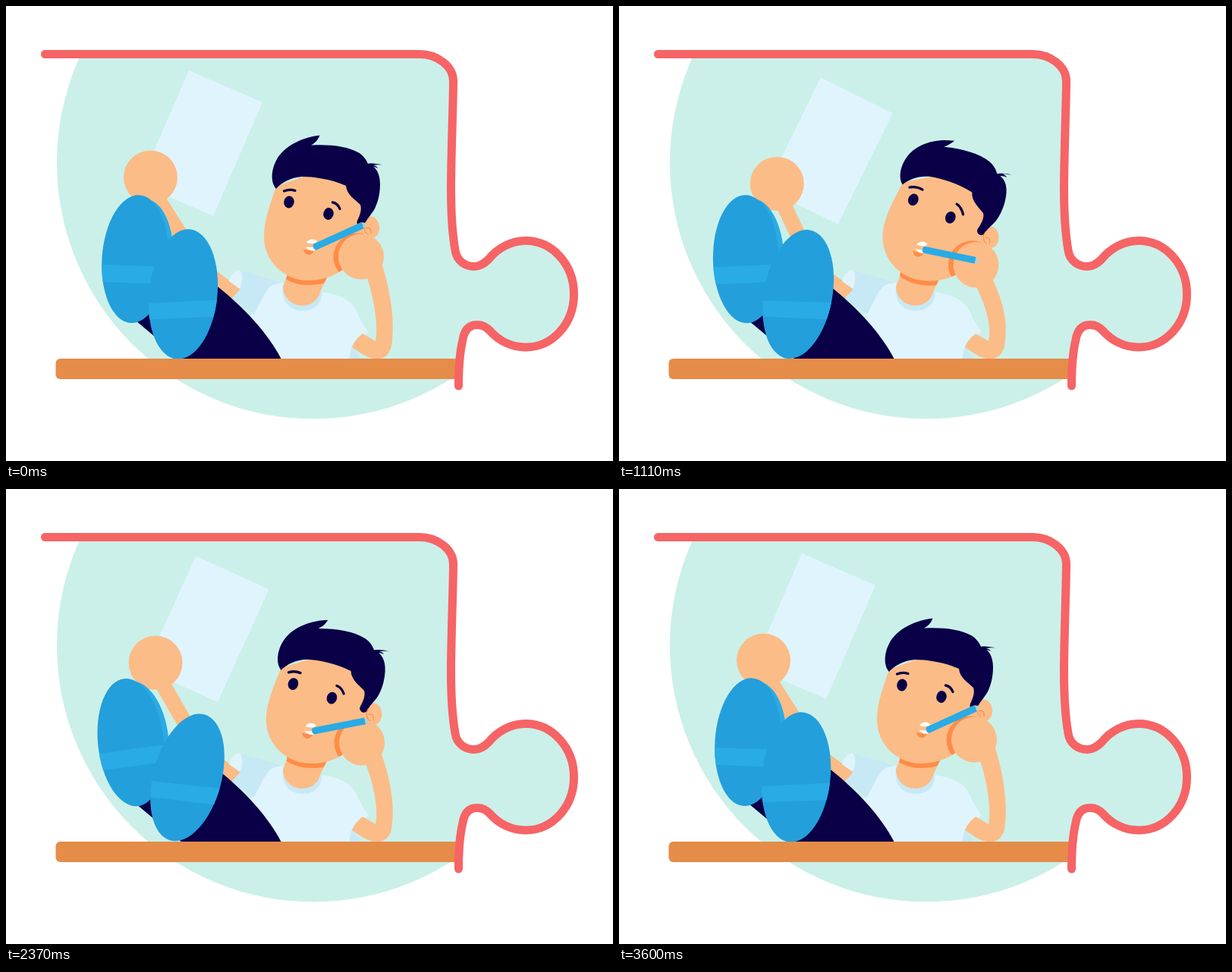
An HTML page with a canvas for the animation above (3.63 s loop, 800 px wide and 600 px high).

```html
<!DOCTYPE html>
<html lang="en">
<head>
<meta charset="utf-8">
<title>Thinking with a pencil</title>
<style>
html, body { margin: 0; width: 100%; height: 100%; overflow: hidden; background: #fff; }
canvas { display: block; }
</style>
</head>
<body>
<canvas id="stage" width="800" height="600"></canvas>
<script>
const ctx = document.getElementById('stage').getContext('2d');
const LOOP = 3630, STEP = 30;
const MINT = '#cbf0e9', PALE = '#e0f4fe', SHADE = '#c7e9f6', SKIN = '#fbbc87', ORANGE = '#ff8c47',
  NAVY = '#090048', BLUE = '#239fdc', SKY = '#29abe5', WOOD = '#e58c49', RED = '#f66466';

const OUTLINE = 'M51.5 63.5H545C568 63.5 589.5 79 589.5 99C589.5 125 586.5 200 586.5 240' +
  'C586.5 275 589 305 592 322C594 336 605 343.5 617 343.5C625 343.5 631 339 636 334' +
  'C648 319 666 309.5 685 309.5C720 309.5 748.5 341 748.5 380C748.5 419 720 450 685 450' +
  'C667 450 650 442 638 428.5C632 422 626 420 620 420.5C610 421 604 428 602 440' +
  'C598 457 596.5 478 596.5 501';
const FACE = 'M356 238C347 265 340 283 340 304C340 338 368 362 398 362' +
  'C422 362 440 353 455 338L475 300L470 255L449 232L400 222Z';
const NECK = 'M372 345L370 357C368 363 365 367 365 372C367 387 378 395 391 395' +
  'C403 395 412 387 414 377L423 358L423 345Z';

const lerp = (a, b, k) => a + (b - a) * k;
const rad = deg => deg * Math.PI / 180;

function fill(color, d) {
  ctx.fillStyle = color;
  ctx.fill(new Path2D(d));
}

function stroke(color, width, d) {
  ctx.strokeStyle = color;
  ctx.lineWidth = width;
  ctx.lineCap = ctx.lineJoin = 'round';
  ctx.stroke(new Path2D(d));
}

function oval(color, x, y, rx, ry = rx, tilt = 0) {
  ctx.fillStyle = color;
  ctx.beginPath();
  ctx.ellipse(x, y, rx, ry, rad(tilt), 0, 2 * Math.PI);
  ctx.fill();
}

function group(draw) {
  ctx.save();
  draw();
  ctx.restore();
}

function spin(x, y, deg) {
  ctx.translate(x, y);
  ctx.rotate(rad(deg));
  ctx.translate(-x, -y);
}

// Cubic Bezier timing (.3, 0, 0, 1)
function glide(x) {
  let lo = 0, hi = 1;
  for (let i = 0; i < 24; i++) {
    const s = (lo + hi) / 2;
    if (0.9 * s * (1 - s) ** 2 + s ** 3 < x) lo = s; else hi = s;
  }
  return lo * lo * (3 - 2 * lo);
}

function leanAt(t) {
  const half = LOOP / 2, e = glide(t % half / half);
  return t < half ? e : 1 - e;
}

function swayAt(t) {
  const period = LOOP / 4, peak = 0.48, p = t % period / period;
  const u = p < peak ? p / peak : (1 - p) / (1 - peak);
  return (u * u * (3 - 2 * u)) ** 1.15;
}

function background() {
  ctx.fillStyle = '#fff';
  ctx.fillRect(0, 0, 800, 600);
  group(() => {
    ctx.clip(new Path2D(OUTLINE + 'V600H0V63.5Z'));
    oval(MINT, 405, 206.5, 338);
    ctx.fillStyle = MINT;
    ctx.fillRect(560, 64, 200, 427);
  });
}

function paperAndArm(k) {
  group(() => {
    ctx.translate(lerp(241, 267.7, k), lerp(85, 95.3, k));
    ctx.rotate(rad(lerp(23.4, 26.4, k)));
    ctx.fillStyle = PALE;
    ctx.fillRect(0, 0, 105.7, 163.3);
  });
  const x = lerp(190.5, 209.6, k), y = lerp(226, 235, k);
  stroke(SKIN, 20.5, `M${lerp(188, 206, k)} 236L${lerp(235, 240, k)} 310L250 335`);
  oval(SKIN, x, y, 35.5);
  fill(SKIN, 'M270 344L309 373L298 388L262 362Z');
}

function body() {
  fill(SHADE, 'M309 349L352 361L364 366C346 373 340 390 330 408L297 386L309 373Z');
  fill(PALE, 'M304 349C298 353 295 358 294 363L308 373C312 365 312 356 309 349C307 348 305 348 304 349Z');
  fill(PALE, 'M363 466L318 408L327 406C336 391 342 373 351 368C356 366 361 366 366 365' +
    'L415 377C442 381 455 388 462 403C467 414 472 422 478 430L456 448L452 466Z');
  fill(SHADE, 'M456 449L452 466H468Z');
  fill(SHADE, 'M365 368C362 390 374 402 391 402C407 402 418 391 416 375L390 370Z');
  fill(NAVY, 'M165 410L232 466H363C346 433 315 398 275 367L225 360Z');
}

function foot(x, y, rx, ry, tilt, stripe, rim) {
  if (rim) oval(SKY, x + 7.5, y - 2, rx - 1, ry - 6.5, tilt);
  oval(BLUE, x, y, rx, ry, tilt);
  ctx.clip();
  fill(SKY, stripe);
}

function feet(k) {
  group(() => {
    spin(170, 364, -12.4 * k);
    foot(170, 333.7, 43.5, 84.5, 4, 'M110 340L220 344.5V367.5L110 363Z', true);
  });
  group(() => {
    spin(234, 415, 11 * k);
    foot(233.5, 380, 45, 86, 6, 'M180 392.3L290 387V409.5L180 413.5Z');
  });
}

function hair(k) {
  fill(NAVY, 'M356 241C348 232 350 215 356 204C364 188 385 174 ' +
    `${413.5 + k} ${170.5 + 3 * k}C411 177 408 180 402 183.5C427 182 450 185 464 193` +
    'C471 197 475 203 477 208C487 211 493 220 493 235C493 250 489 262 485 269' +
    'C480 277 475 281 473 288C471 291 467 292 464 289C462 287 462 284 464 281' +
    'C467 274 469 268 467 262C460 255 449 249 448 237C428 228 405 225 390 225' +
    'C375 226 363 233 356 241Z');
  const y = 208 - 3.5 * k;
  fill(NAVY, `M474 209C480 206 488 ${y} 497 ${y + 1.5}C490 ${y + 1} 487 ${y + 2} 484 ${y + 2}` +
    `C488 ${y + 3} 489 ${y + 4} 490 ${y + 6}C487 ${y + 4} 483 ${y + 4} 478 212Z`);
}

function head(k) {
  const turn = 9.6 * k;
  group(() => {
    fill(SKIN, NECK);
    ctx.clip(new Path2D(NECK));
    ctx.translate(0, 6);
    spin(400, 352, turn);
    fill(ORANGE, FACE);
  });
  group(() => {
    spin(400, 352, turn);
    oval(SKIN, 482, 291.5, 10, 14, -8);
    fill(SKIN, FACE);
    hair(k);
    oval(NAVY, 373, 258.5, 6.7, 8, 14);
    oval(NAVY, 425, 274, 6.7, 8, 14);
    stroke(NAVY, 3.3, `M${366.5 - k} ${244 - k}Q374 ${241 - k} ${381 + 2 * k} 243.5`);
    stroke(NAVY, 3.3, `M430.5 ${259 - 4 * k}Q437 ${260 - 2 * k} ${440 + k} 267.5`);
    stroke(ORANGE, 1.1, 'M474 285C470 291 472 298 477 301M474 293C479 291 482 294 481 300');
    group(() => {
      ctx.clip(new Path2D(FACE));
      oval(ORANGE, 463, 331, 31.5);
    });
    oval(SKIN, 468, 330.5, 30);
  });
}

function mouthAndPencil(k) {
  group(() => {
    ctx.translate(-4.5 * k, 3.3 * k);
    spin(402, 317, 6 * k);
    fill(ORANGE, 'M392 321C394 330 402 330 406 323Z');
    fill('#fff', 'M396 312C399 307 406 306 410 310C409 314 402 314 396 312Z');
    fill('#fff', 'M395 317.5C400 319 406 317 410 320C408 324 399 324 395 317.5Z');
  });
  group(() => {
    ctx.translate(lerp(404.5, 398.8, k), lerp(319, 321, k));
    ctx.rotate(rad(lerp(-24.5, 14.3, k)));
    fill(SKY, 'M3 -4.5H72V4.5H3C0 3 0 -3 3 -4.5Z');
    fill('#b5cfc5', 'M72 -4.5L77 -1V1L72 4.5Z');
  });
}

function rightArm(k) {
  const ox = lerp(496, 491, k), oy = lerp(342, 359, k);
  const ix = lerp(473, 468, k), iy = lerp(350, 366, k);
  fill(SKIN, `M${ox} ${oy}C509 ${lerp(385, 397, k)} 512 420 508.5 445C507 461 496 467 485 465` +
    'C474 463 465 456 456 450C459 442 464 437 470 432L487 442' +
    `C491 425 486 ${lerp(385, 400, k)} ${ix} ${iy}Z`);
}

function render(t) {
  const lean = leanAt(t);
  background();
  paperAndArm(lean);
  body();
  feet(swayAt(t));
  rightArm(lean);
  head(lean);
  mouthAndPencil(lean);
  ctx.fillStyle = WOOD;
  ctx.beginPath();
  ctx.roundRect(65.5, 465, 529, 27, [6, 0, 0, 6]);
  ctx.fill();
  stroke(RED, 11, OUTLINE);
}

function tick() {
  render(Math.floor(performance.now() % LOOP / STEP) * STEP);
  requestAnimationFrame(tick);
}
tick();
</script>
</body>
</html>
```
